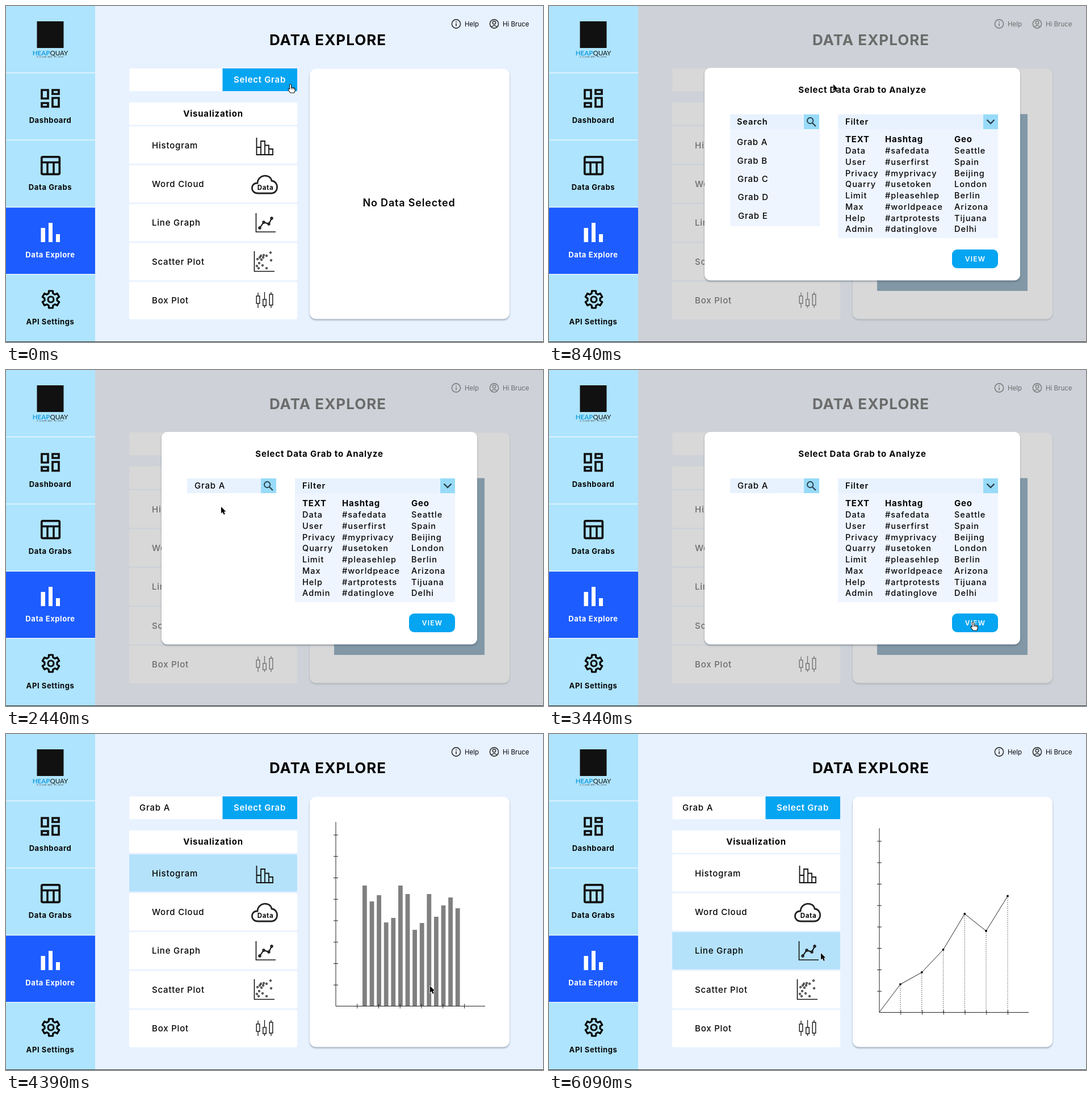
Write an HTML page that moves like this. It is 946x592 px and loops after 6140 ms.

```html
<!DOCTYPE html>
<html lang="en">
<head>
<meta charset="utf-8">
<title>Data Explore</title>
<style>
  html, body { margin: 0; width: 100%; height: 100%; overflow: hidden; background: #e8f2ff; }
  svg { display: block; width: 946px; height: 592px; }
  text { font-family: Inter, "Open Sans", sans-serif; white-space: pre; }
  .nav { font-size: 13px; font-weight: 700; letter-spacing: .6px; }
  .item { font-size: 15px; font-weight: 500; letter-spacing: .8px; }
  .btn { font-size: 15px; font-weight: 600; letter-spacing: .7px; }
  .head { font-size: 15px; font-weight: 700; letter-spacing: .8px; }
  .label { font-size: 14.5px; font-weight: 600; letter-spacing: .9px; }
  .cell { font-size: 14.5px; font-weight: 500; letter-spacing: 1px; }
  .title { font-size: 26px; font-weight: 700; letter-spacing: 1px; }
  .empty { font-size: 18px; font-weight: 600; letter-spacing: .8px; }
  .small { font-size: 11.5px; }
  .view { font-size: 12px; font-weight: 600; letter-spacing: 1.2px; }
  .cloud { font-size: 11.5px; font-weight: 700; letter-spacing: .7px; }
  .word { font-family: Lato, sans-serif; font-size: 11.6px; }
  .tag { font-size: 3.4px; letter-spacing: .5px; }
  .raised { filter: drop-shadow(0 2px 1.5px rgba(40, 60, 80, .4)); }
</style>
</head>
<body>
<svg id="stage" viewBox="0 0 946 592" xmlns="http://www.w3.org/2000/svg"></svg>
<script>
const LOOP = 6140;
const OPEN = 340, PICK = 2140, CLOSE = 3690, SWITCH = 5640;
const BG = '#e8f2ff', SIDE = '#aee4fd', BLUE = '#05a5f2', PICKED = '#b4e2fb';

// Markup helpers
const rect = (x, y, w, h, fill, extra = '') =>
  `<rect x="${x}" y="${y}" width="${w}" height="${h}" fill="${fill}" ${extra}/>`;
const path = (d, width = 1, color = '#111', extra = '') =>
  `<path d="${d}" fill="none" stroke="${color}" stroke-width="${width}" ${extra}/>`;
const dot = (x, y, r, extra = '') => `<circle cx="${x}" cy="${y}" r="${r}" ${extra}/>`;
const ring = (x, y, r, width, color = '#111', fill = 'none') =>
  dot(x, y, r, `fill="${fill}" stroke="${color}" stroke-width="${width}"`);
const group = (id, body, extra = '') => `<g id="${id}" ${extra}>${body}</g>`;

const SIZE = { title: 26, empty: 18, nav: 13, view: 12, small: 11.5, cloud: 11.5, label: 14.5, cell: 14.5 };
// y is the middle of the capitals
function text(cls, x, y, str, anchor = 'start', fill = '#050505') {
  const base = (y + (SIZE[cls] || 15) * 0.364).toFixed(2);
  return `<text class="${cls}" x="${x}" y="${base}" text-anchor="${anchor}" fill="${fill}">${str}</text>`;
}

function gear(cx, cy) {
  const pts = [];
  for (let i = 0; i < 6; i++) {
    for (const [off, r] of [[-20, 11.2], [-13, 15.4], [13, 15.4], [20, 11.2]]) {
      const a = (i * 60 - 90 + off) * Math.PI / 180;
      pts.push((cx + r * Math.cos(a)).toFixed(2) + ' ' + (cy + r * Math.sin(a)).toFixed(2));
    }
  }
  return path('M' + pts.join('L') + 'Z', 3.2, '#050505', 'stroke-linejoin="round"') + ring(cx, cy, 5, 3.2);
}

function sidebar() {
  let s = rect(0, 0, 157, 592, SIDE) + rect(0, 355, 157, 117.5, '#1d5cff');
  for (const y of [117, 235.3, 353.6, 472]) s += rect(0, y, 157, 1.6, '#e6f5ff');
  s += rect(54.5, 27, 47, 47, '#111');
  s += '<text class="word" x="78" y="86.5" text-anchor="middle"><tspan fill="#169fe0" font-weight="700">HEAP</tspan><tspan fill="#111">QUAY</tspan></text>';
  s += '<text class="tag" x="78" y="90.8" text-anchor="middle" fill="#333">A CLEAR WAY TO DATA</text>';
  s += path('M63 148H74V163H63ZM82 148H93V155H82ZM63 171H74V177.5H63ZM82 162H93V177.5H82Z', 3.7);
  s += rect(62.8, 265.8, 31.5, 30.5, 'none', 'rx="2" stroke="#111" stroke-width="3.7"');
  s += path('M62 275.5H95M73 275V296M84 275V296', 3.5);
  s += rect(61.5, 391, 7.5, 25, '#fff') + rect(75, 382, 7, 34, '#fff') + rect(88, 402, 7, 14, '#fff');
  s += gear(79, 517);
  const names = ['Dashboard', 'Data Grabs', 'Data Explore', 'API Settings'];
  names.forEach((n, i) => s += text('nav', 78, 201 + i * 118.4, n, 'middle', i === 2 ? '#fff' : '#050505'));
  return s;
}

function topBar() {
  const ink = '#333';
  return text('title', 567, 59.5, 'DATA EXPLORE', 'middle')
    + ring(793, 31.5, 7.6, 1.6, ink) + path('M793 30.5V35.5M793 27.2V29', 1.7, ink)
    + text('small', 808, 31.5, 'Help')
    + ring(860, 31.5, 7.6, 1.6, ink) + ring(860, 29.5, 2.7, 1.5, ink)
    + path('M854.8 36.8Q860 32.2 865.2 36.8', 1.5, ink)
    + text('small', 875, 31.5, 'Hi Bruce');
}

const rows = [['Histogram', 212], ['Word Cloud', 280.5], ['Line Graph', 349], ['Scatter Plot', 417.5], ['Box Plot', 486]];

function icons() {
  let s = path('M441.5 232V262H471M441.5 249H449V262M449 249V238H456V262M456 245.5H463V262M463 252H470V262', 1.8);
  s += path('M444 330C430 330 430 312 443 312C444 296 466 295 468 308C481 309 481 330 467 330Z', 2.8, '#222');
  s += text('cloud', 457, 319.5, 'Data', 'middle');
  s += path('M440.5 365V398H475', 1.6) + path('M447 391L454 381L463 384L468 374', 2);
  for (const [x, y] of [[447, 391], [454, 381], [463, 384], [468, 374]]) s += ring(x, y, 1.9, 1.5, '#111', '#444');
  s += path('M437.5 432V467.5H473', 1.6);
  for (const [x, y] of [[442, 458], [445, 462], [446, 453], [443, 446], [449, 440], [450, 447], [453, 443],
    [454, 439], [459, 440], [466, 434.5], [467, 448], [459, 462], [452, 457], [447, 443]]) s += ring(x, y, 1.4, 1.2);
  for (const [x, top, y, h] of [[444, 505, 511, 13], [455.5, 504, 517, 11], [467, 504, 508, 19]]) {
    s += path(`M${x} ${top}V532`, 1.3) + rect(x - 2.8, y, 5.6, h, '#fff', 'stroke="#111" stroke-width="1.4"');
  }
  return s;
}

function axes(x, top) {
  let d = `M${x} ${top}V${top + 324.5}H${x + 263}`;
  for (let i = 0; i < 8; i++) d += `M${x - 4} ${top + 23 + i * 37.75}h8`;
  for (let i = 1; i < 7; i++) d += `M${x + i * 37.75} ${top + 320.5}v8`;
  return path(d, 1, '#222');
}

function histogram() {
  const tops = [267, 295, 284, 332, 324, 267, 282, 345, 333, 282, 322, 302, 288, 307];
  return tops.map((y, i) => rect(628 + i * 12.6, y, 7.8, 479 - y, '#808080')).join('') + axes(581, 155);
}

function lineChart() {
  const pts = [[582, 490], [619, 441], [656.7, 420], [694.5, 380], [732.3, 317], [770, 347], [808, 285.5]];
  let s = axes(582, 166) + path('M' + pts.join('L'), 1, '#222');
  for (const [x, y] of pts.slice(1)) s += path(`M${x} ${y}V490`, 1, '#444', 'stroke-dasharray="1.5 2"') + dot(x, y, 1.9);
  return s;
}

function explorer() {
  let s = rect(217.5, 110, 164, 40, '#fff') + rect(381.5, 110, 131.5, 40, BLUE)
    + text('btn', 447, 130, 'Select Grab', 'middle', '#fff')
    + group('chosen', text('item', 235, 130, 'Grab A'))
    + rect(217, 170, 296, 39.5, '#fff', 'rx="2"') + text('head', 365, 189.5, 'Visualization', 'middle');
  rows.forEach(([name, y], i) => {
    s += rect(217, y, 296, 65.7, '#fff', `rx="2" id="row${i}"`) + text('item', 257, y + (i ? 33 : 34), name);
  });
  return s + icons()
    + rect(535, 110.5, 352, 441, '#fff', 'rx="11" class="raised"')
    + group('none', text('empty', 710, 346, 'No Data Selected', 'middle'))
    + group('hist', histogram()) + group('line', lineChart());
}

function dialog() {
  const cols = [
    [522, 'TEXT Data User Privacy Quarry Limit Max Help Admin'],
    [592, 'Hashtag #safedata #userfirst #myprivacy #usetoken #pleasehlep #worldpeace #artprotests #datinglove'],
    [714, 'Geo Seattle Spain Beijing London Berlin Arizona Tijuana Delhi']];
  let s = rect(157, 0, 789, 592, '#bababa', 'fill-opacity=".565"')
    + rect(578, 190.5, 265, 311.5, '#8298a6')
    + rect(274, 109, 556, 374.5, '#fff', 'rx="10" class="raised"')
    + text('head', 552, 148, 'Select Data Grab to Analyze', 'middle')
    + rect(319, 191, 157, 26, BG) + rect(449, 191, 27, 26, '#98dbf8')
    + ring(460.2, 202, 5.2, 1.9, '#2b3f4c') + path('M464 206L470 212', 2.2, '#2b3f4c')
    + rect(509, 191, 282, 218, '#eef5ff') + rect(509, 191, 282, 26, BG) + rect(765, 191, 26, 26, '#98dbf8')
    + path('M771.5 200.5L778 207L784.5 200.5', 2.4, '#2b3f4c') + text('label', 522, 204, 'Filter');
  let list = rect(319, 217, 158, 171, '#eef5ff') + text('label', 331, 204, 'Search');
  'ABCDE'.split('').forEach((c, i) => list += text('item', 331 + i * 0.5, 240 + i * 32.3, 'Grab ' + c));
  s += group('list', list) + group('picked', text('item', 332, 204, 'Grab A'));
  for (const [x, words] of cols) {
    words.split(' ').forEach((w, i) => s += text(i ? 'cell' : 'head', x, 235 + i * 19.75, w));
  }
  return s + rect(710, 429, 81, 33, BLUE, 'rx="9"') + text('view', 751, 445.5, 'VIEW', 'middle', '#fff');
}

const arrow = '<path d="M0 0V11.8L2.7 9.2L4.7 13.8L6.8 12.9L4.8 8.5H8.4Z" fill="#000" stroke="#fff" stroke-width="1.2" paint-order="stroke"/>';
const hand = '<path d="M-1.5 8.5V1.3a1.5 1.5 0 0 1 3 0V6q1.3-1 2.4.2q1.3-.7 2.3.4q1.7-.3 1.9 1.4V11q0 2-1.5 4H0L-3.8 9.8q-.8-2 1-1.7Z" fill="#fff" stroke="#111" stroke-width="1.1" stroke-linejoin="round"/>'
  + path('M1.5 6V9M3.9 6.4V9M6.2 7V9', 0.8);

document.getElementById('stage').innerHTML = rect(0, 0, 946, 592, BG) + topBar() + explorer()
  + group('dialog', dialog()) + sidebar() + rect(0, 591, 946, 1, '#30353a')
  + group('cursor', group('arrow', arrow) + group('hand', hand));

// Pointer stops: time, x, y
const stops = [[0, 501, 138], [840, 501, 138], [1640, 379, 241], [2490, 379, 241], [3290, 747, 444],
  [4390, 747, 444], [5140, 494, 392], [5190, 494, 392], [5490, 479, 386], [LOOP, 479, 386]];

function pointer(t) {
  const i = stops.findIndex(s => s[0] > t);
  const [t0, x0, y0] = stops[i - 1], [t1, x1, y1] = stops[i];
  const p = (t - t0) / (t1 - t0), e = p * p * (3 - 2 * p);
  return [x0 + (x1 - x0) * e, y0 + (y1 - y0) * e];
}

const el = id => document.getElementById(id);
const show = (id, on) => el(id).setAttribute('display', on ? 'inline' : 'none');
const inside = (x, y, l, t, r, b) => x >= l && x <= r && y >= t && y <= b;

function clickable(x, y, open, listed, selected) {
  if (open) return inside(x, y, 710, 429, 791, 462) || (listed && inside(x, y, 319, 217, 477, 388));
  return inside(x, y, 381, 110, 513, 150)
    || rows.some(([, top], i) => i !== selected && inside(x, y, 217, top, 513, top + 66));
}

function draw(t) {
  const open = t >= OPEN && t < CLOSE, listed = t < PICK;
  const selected = t < CLOSE ? -1 : t < SWITCH ? 0 : 2;
  show('dialog', open);
  show('list', listed);
  show('picked', !listed);
  show('chosen', t >= CLOSE);
  show('none', selected < 0);
  show('hist', selected === 0);
  show('line', selected === 2);
  rows.forEach((r, i) => el('row' + i).setAttribute('fill', i === selected ? PICKED : '#fff'));
  const [x, y] = pointer(t);
  const over = clickable(x, y, open, listed, selected);
  show('hand', over);
  show('arrow', !over);
  el('cursor').setAttribute('transform', `translate(${x.toFixed(1)} ${y.toFixed(1)})`);
}

const start = performance.now();
function tick() {
  const t = (performance.now() - start) % LOOP;
  draw(t < 40 ? 0 : 40 + Math.floor((t - 40) / 50) * 50);
  requestAnimationFrame(tick);
}
tick();
</script>
</body>
</html>
```
